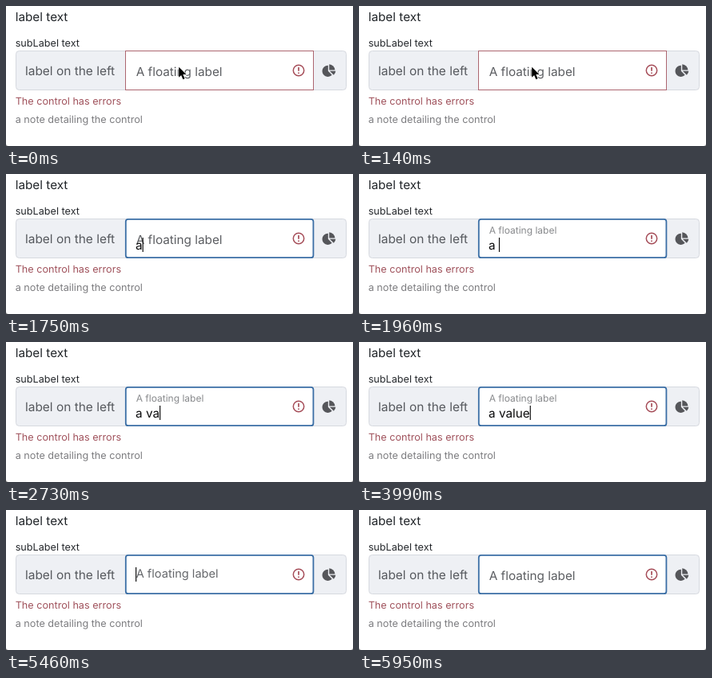
An HTML page that plays this animation: 434x176 px, repeating every 6440 ms.

```html
<!DOCTYPE html>
<html lang="en">
<head>
<meta charset="utf-8">
<title>Form control</title>
<style>
  html, body { margin: 0; width: 100%; height: 100%; overflow: hidden; background: #fff; }
  svg { display: block; font: 15.3px Inter, Roboto, sans-serif; text-rendering: geometricPrecision; }
  text { white-space: pre; }
  .small { font-size: 12.65px; }
</style>
</head>
<body>
<svg width="434" height="176" viewBox="0 0 434 176">
  <path d="M0 173v3h3q-3 0-3-3zM434 173v3h-3q3 0 3-3z" fill="#777"/>

  <text x="11.7" y="18.7" fill="#212529">label text</text>
  <text x="11.7" y="51" fill="#25282c" class="small">subLabel text</text>
  <text x="11.7" y="124" fill="#a0525c" class="small">The control has errors</text>
  <text x="11.7" y="147" fill="#7c7c7f" class="small">a note detailing the control</text>

  <rect x="12.5" y="56.5" width="413" height="49" rx="4" fill="#eef0f4" stroke="#d6d9df"/>
  <text x="24" y="87" fill="#55585d" font-size="15.45">label on the left</text>
  <g fill="#55565a" transform="translate(396.2 73.3) scale(.95)">
    <path d="M7 1.4A7.5 7.5 0 1 0 12.1 14.2L7 9z"/>
    <path d="M8.5 0A8 8 0 0 1 16 7.5H8.5z"/>
    <path d="M9.1 9H17A8 8 0 0 1 14.4 14.2z"/>
  </g>

  <rect id="field" fill="#fff"/>
  <g fill="none" stroke="#a64e59" stroke-width="1.5">
    <circle cx="366" cy="81" r="6.7"/>
    <path d="M366 77v4.8M366 83.4v1.7" stroke-width="1.7"/>
  </g>

  <rect id="selection" x="162" y="80" width="50" height="18" fill="#b7d4f5"/>
  <text id="label" fill="#5b5d61">A floating label</text>
  <text id="value" x="162" y="95" fill="#0c0c0d"></text>
  <rect id="caret" width="1.2" height="18" fill="#111"/>

  <path id="arrow" d="M216.2 76.7v13l2.9-2.8 2.3 5.3 2.2-1-2.3-5.1h4.1z"
        fill="#000" stroke="#fff" stroke-width="1.2" paint-order="stroke"/>
  <g id="click" fill="none" stroke="#111">
    <circle cx="215" cy="77" r="16.8" stroke-width="1.5"/>
    <g stroke="#fff" stroke-width="3"><use href="#beam"/></g>
    <path id="beam" d="M212.5 69.5q2.8 0 2.8 2.5q0-2.5 2.8-2.5M215.3 72v10M212.5 84.5q2.8 0 2.8-2.5q0 2.5 2.8 2.5M213.3 78h4"/>
  </g>
</svg>
<script>
const LOOP = 6440, STEP = 70, FLOAT_MS = 200;
const FOCUS = 1400, RELEASE = 1540, TYPE = 1750, SELECT = 4690, CLEAR = 5320;

// Each entry: start time, typed text
const typing = [[0, ""], [TYPE, "a"], [1890, "a "], [2660, "a v"], [2730, "a va"],
  [3780, "a val"], [3920, "a valu"], [3990, "a value"], [CLEAR, ""]];
// Spans in which the caret is visible
const caretSpans = [[FOCUS, 2520], [2660, 3290], [3780, 4550], [CLEAR, 5950]];

const $ = id => document.getElementById(id);
const set = (id, attrs) => {
  for (const name in attrs) $(id).setAttribute(name, attrs[name]);
};
const show = (id, on) => set(id, { visibility: on ? "visible" : "hidden" });
const within = (t, [from, to]) => t >= from && t < to;
const ease = (t, start) => {
  const p = Math.min(1, Math.max(0, (t - start) / FLOAT_MS));
  return p * p * (3 - 2 * p);
};

function draw(t) {
  const focused = t >= FOCUS;
  set("field", focused
    ? { x: 149.8, y: 56.8, width: 234.6, height: 48.4, rx: 3, stroke: "#3a6ea5", "stroke-width": 1.8 }
    : { x: 149.5, y: 56.5, width: 235, height: 49, rx: 0, stroke: "#ad6670", "stroke-width": 1 });

  const raised = ease(t, TYPE) - ease(t, CLEAR);
  set("label", {
    transform: `translate(162.7 ${88 - 13 * raised}) scale(${1 - 0.215 * raised})`,
    opacity: 1 - 0.28 * raised
  });

  const text = typing.filter(([start]) => t >= start).pop()[1];
  $("value").textContent = text;
  const textWidth = text ? $("value").getComputedTextLength() : 0;
  set("caret", { x: 162 + textWidth, y: text ? 80 : 72 });
  show("caret", caretSpans.some(span => within(t, span)));
  show("selection", within(t, [SELECT, CLEAR]));

  show("arrow", !focused);
  show("click", within(t, [FOCUS, RELEASE]));
}

function frame() {
  draw(Math.floor(performance.now() % LOOP / STEP) * STEP);
  requestAnimationFrame(frame);
}
frame();
</script>
</body>
</html>
```
